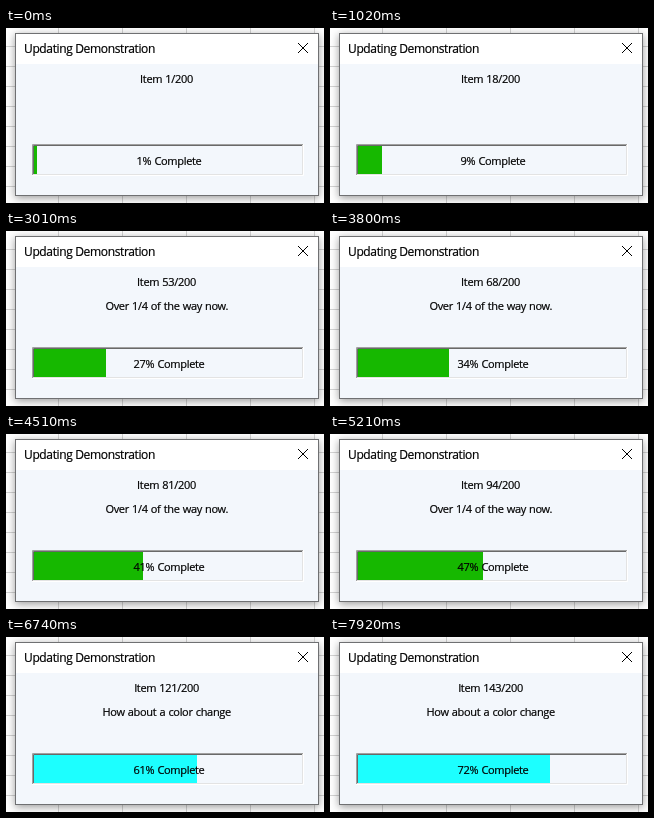
Recreate the animation shown at these times as an HTML page. Size 318x175 px, loop 8 s.

```html
<!DOCTYPE html>
<html lang="en">
<head>
<meta charset="utf-8">
<title>Progress dialog</title>
<style>
html, body { margin: 0; width: 100%; height: 100%; overflow: hidden; background: #fff; }
svg { display: block; }
text {
  font: 11px "Open Sans", "Noto Sans", sans-serif;
  letter-spacing: -.32px; word-spacing: .6px; text-anchor: middle;
  fill: #000; stroke: #000; stroke-width: .2px;
}
.title { font-size: 12px; letter-spacing: -.36px; word-spacing: 0; text-anchor: start; }
.dialog { filter: drop-shadow(0 2px 4px #0006); }
</style>
</head>
<body>
<svg width="318" height="175" viewBox="0 0 318 175">
  <defs>
    <pattern id="cells" x="-11" y="-1" width="64" height="20" patternUnits="userSpaceOnUse">
      <path d="M63.5 0V20M0 19.5H64" fill="none" stroke="#d4d4d4"/>
    </pattern>
  </defs>
  <rect width="318" height="175" fill="#fff"/>
  <rect width="318" height="175" fill="url(#cells)"/>

  <rect class="dialog" x="9" y="5" width="304" height="163" fill="#6f7072"/>
  <rect x="10" y="6" width="302" height="161" fill="#fff"/>
  <rect x="10" y="36" width="302" height="131" fill="#f3f7fc"/>
  <text class="title" x="18" y="25">Updating Demonstration</text>
  <path d="M292 15L302 25M302 15L292 25" stroke="#000"/>

  <!-- sunken progress track -->
  <g fill="none">
    <path d="M26.5 147V116.5H297" stroke="#a0a0a0"/>
    <path d="M27.5 146V117.5H296" stroke="#696969"/>
    <path d="M27 146.5H296.5V117" stroke="#e3e3e3"/>
    <path d="M26 147.5H297.5V116" stroke="#fff"/>
  </g>
  <rect id="bar" x="28" y="118" height="28"/>
  <text id="item" x="160.5" y="55"></text>
  <text id="message" x="160.7" y="79"></text>
  <text id="percent" x="163" y="137"></text>
</svg>
<script>
const LOOP = 8000, STEP = 79.2, LEAD = 20, TOTAL = 200;
// [step, item] pairs: the counter's pace drifts slightly
const pace = [[0, 1], [13, 18], [22, 31], [33, 47], [38, 53], [44, 62],
              [57, 81], [71, 101], [85, 121], [100, 143]];
const byId = id => document.getElementById(id);
const [bar, item, message, percent] = ['bar', 'item', 'message', 'percent'].map(byId);

function itemAt(step) {
  const next = Math.max(1, pace.findIndex(([s]) => s >= step));
  const [s0, n0] = pace[next - 1], [s1, n1] = pace[next];
  return Math.round(n0 + (n1 - n0) * (step - s0) / (s1 - s0));
}

function draw(time) {
  const step = Math.min(100, Math.floor((time % LOOP + LEAD) / STEP));
  const n = itemAt(step);
  const done = Math.round(100 * n / TOTAL);
  const half = n >= TOTAL / 2;
  item.textContent = `Item ${n}/${TOTAL}`;
  percent.textContent = `${done}% Complete`;
  message.textContent = half ? 'How about a color change'
    : n >= TOTAL / 4 ? 'Over 1/4 of the way now.' : '';
  bar.setAttribute('width', Math.round(0.34 + 2.662 * done));
  bar.setAttribute('fill', half ? '#1cffff' : '#16b800');
}

const start = performance.now();
function tick() {
  draw(performance.now() - start);
  requestAnimationFrame(tick);
}
tick();
</script>
</body>
</html>
```
